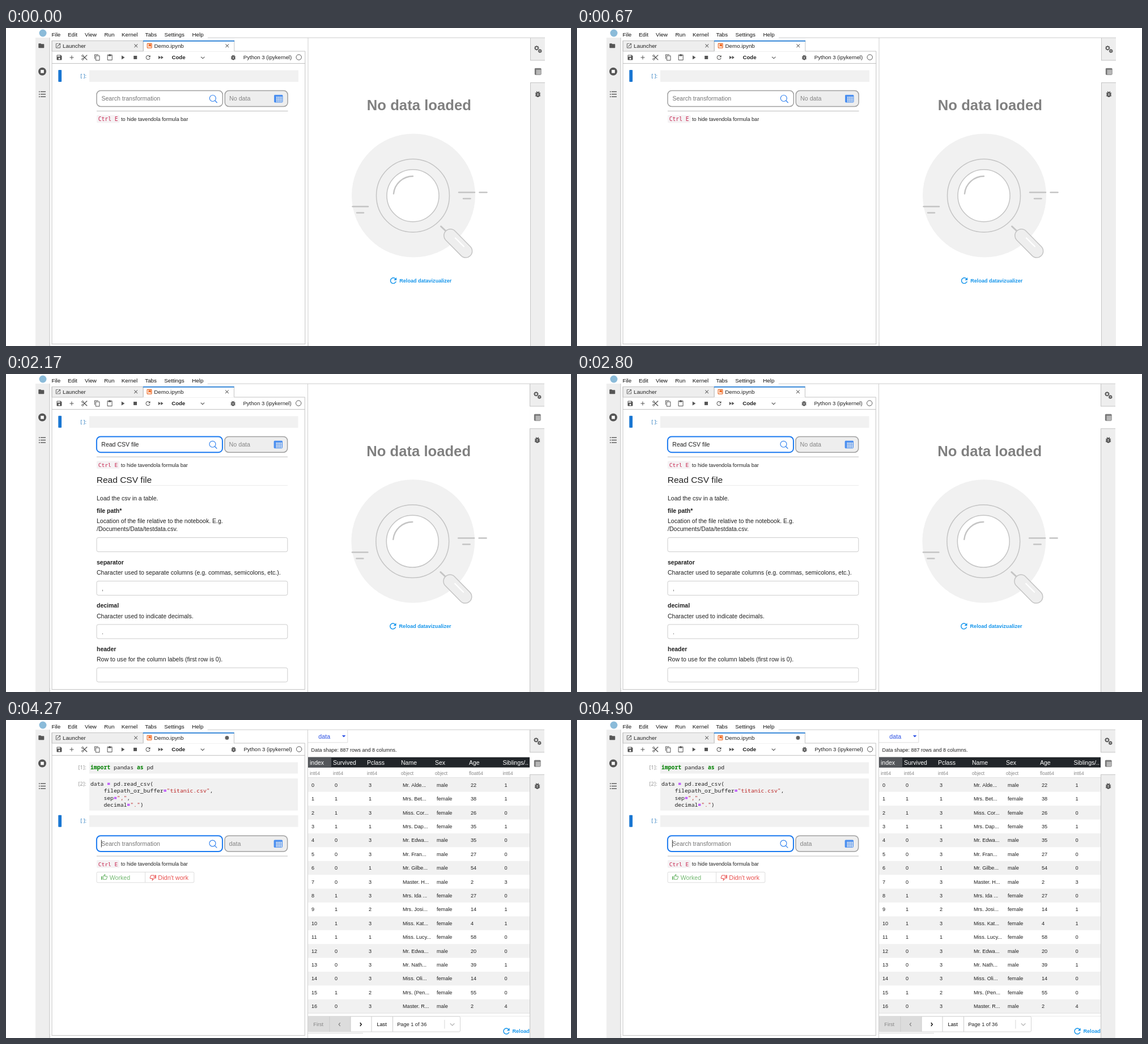
An HTML page with a canvas that plays this animation: 997 px wide and 561 px high, repeating every 5.32 s.

```html
<!DOCTYPE html>
<html lang="en">
<head>
<meta charset="utf-8">
<title>Notebook data import</title>
<style>
html, body { margin: 0; width: 100%; height: 100%; overflow: hidden; background: #fff; }
canvas { display: block; }
</style>
</head>
<body>
<canvas id="stage" width="997" height="561"></canvas>
<script>
const ctx = document.getElementById('stage').getContext('2d');
const SANS = '"Liberation Sans", Arial, sans-serif';
const MONO = '"Noto Sans Mono", "DejaVu Sans Mono", monospace';
const BLUE = '#1976d2', INK = '#212121', ICON = '#555', EDGE = '#c4c4c4', LINK = '#1495eb';

// Material-style icons on a 24 unit grid
const ICONS = {
  save: 'M17 3H5c-1.1 0-2 .9-2 2v14c0 1.1.9 2 2 2h14c1.1 0 2-.9 2-2V7l-4-4zm-5 16c-1.7 0-3-1.3-3-3s1.3-3 3-3 3 1.3 3 3-1.3 3-3 3zm3-10H5V5h10v4z',
  add: 'M19 13h-6v6h-2v-6H5v-2h6V5h2v6h6v2z',
  copy: 'M16 1H4C2.9 1 2 1.9 2 3v14h2V3h12V1zm3 4H8C6.9 5 6 5.9 6 7v14c0 1.1.9 2 2 2h11c1.1 0 2-.9 2-2V7c0-1.1-.9-2-2-2zm0 16H8V7h11v14z',
  paste: 'M19 2h-4.2C14.4.8 13.3 0 12 0S9.6.8 9.2 2H5C3.9 2 3 2.9 3 4v16c0 1.1.9 2 2 2h14c1.1 0 2-.9 2-2V4c0-1.1-.9-2-2-2zm0 18H5V4h2v3h10V4h2v16z',
  play: 'M8 5v14l11-7z',
  stop: 'M6 6h12v12H6z',
  skip: 'M4 18l8.5-6L4 6v12zm9-12v12l8.5-6L13 6z',
  reload: 'M17.65 6.35C16.2 4.9 14.2 4 12 4c-4.4 0-8 3.6-8 8s3.6 8 8 8c3.7 0 6.8-2.5 7.7-6h-2.1c-.8 2.3-3 4-5.6 4-3.3 0-6-2.7-6-6s2.7-6 6-6c1.7 0 3.1.7 4.2 1.8L13 11h7V4l-2.35 2.35z',
  bug: 'M20 8h-2.8c-.5-.8-1.1-1.5-1.8-2L17 4.4 15.6 3l-2.2 2.2a6 6 0 0 0-2.8 0L8.4 3 7 4.4 8.6 6c-.7.5-1.3 1.2-1.8 2H4v2h2.1l-.1 2H4v2h2l.1 2H4v2h2.8c1 1.8 3 3 5.2 3s4.2-1.2 5.2-3H20v-2h-2.1l.1-2h2v-2h-2l-.1-2H20V8zm-6 8h-4v-2h4v2zm0-4h-4v-2h4v2z',
  folder: 'M10 4H4c-1.1 0-2 .9-2 2v12c0 1.1.9 2 2 2h16c1.1 0 2-.9 2-2V8c0-1.1-.9-2-2-2h-8l-2-2z',
  launch: 'M19 19H5V5h7V3H5c-1.1 0-2 .9-2 2v14c0 1.1.9 2 2 2h14c1.1 0 2-.9 2-2v-7h-2v7zM14 3v2h3.6l-9.8 9.8 1.4 1.4L19 6.4V10h2V3h-7z',
  close: 'M19 6.4L17.6 5 12 10.6 6.4 5 5 6.4 10.6 12 5 17.6 6.4 19 12 13.4 17.6 19 19 17.6 13.4 12z',
  thumb: 'M9 21h9c.8 0 1.5-.5 1.8-1.2l3-7c.1-.3.2-.5.2-.8v-2c0-1.1-.9-2-2-2h-6.3l1-4.9c0-.4-.2-.8-.5-1L14.2 1 7.6 7.6C7.2 8 7 8.5 7 9v10c0 1.1.9 2 2 2zM9 9l4.3-4.3L12 10h9v2l-3 7H9V9zM1 9h4v12H1z'
};

function rect(x, y, w, h, color) {
  ctx.fillStyle = color;
  ctx.fillRect(x, y, w, h);
}

function box(x, y, w, h, r, fill, stroke, lw = 1) {
  ctx.beginPath();
  ctx.roundRect(x, y, w, h, r);
  if (fill) { ctx.fillStyle = fill; ctx.fill(); }
  if (stroke) { ctx.strokeStyle = stroke; ctx.lineWidth = lw; ctx.stroke(); }
}

function disc(x, y, r, fill, stroke, lw = 1) {
  box(x - r, y - r, 2 * r, 2 * r, r, fill, stroke, lw);
}

function line(color, lw, ...p) {
  ctx.beginPath();
  for (let i = 0; i < p.length; i += 2) ctx.lineTo(p[i], p[i + 1]);
  ctx.strokeStyle = color;
  ctx.lineWidth = lw;
  ctx.stroke();
}

// y is the middle of the capitals; returns the end of the text
function text(s, x, y, size, color = INK, weight = '', family = SANS) {
  ctx.font = `${weight} ${size}px ${family}`;
  ctx.fillStyle = color;
  ctx.fillText(s, x, y + size * 0.355);
  return x + ctx.measureText(s).width;
}

function icon(name, x, y, size = 12, color = ICON, turn = 0) {
  ctx.save();
  ctx.translate(x, y);
  ctx.rotate(turn);
  ctx.scale(size / 24, size / 24);
  ctx.translate(-12, -12);
  ctx.fillStyle = color;
  ctx.fill(new Path2D(ICONS[name]), 'evenodd');
  ctx.restore();
}

function gear(x, y, r) {
  disc(x, y, r, null, ICON, 1.5);
  for (let i = 0; i < 8; i++) {
    const a = i * Math.PI / 4, c = Math.cos(a), s = Math.sin(a);
    line(ICON, 1.3, x + c * r, y + s * r, x + c * (r + 1.7), y + s * (r + 1.7));
  }
}

function grid(x, y, w, h, color, cols, rows) {
  box(x, y, w, h, 1, null, color, 1);
  rect(x, y, w, h / rows, color);
  rect(x, y, w / cols, h, color);
  for (let i = 1; i < cols; i++) rect(x + i * w / cols - 0.35, y, 0.7, h, color);
  for (let i = 1; i < rows; i++) rect(x, y + i * h / rows - 0.35, w, 0.7, color);
}

function scissors(x, y) {
  disc(x - 3.2, y - 3, 1.5, null, ICON, 1);
  disc(x - 3.2, y + 3, 1.5, null, ICON, 1);
  line(ICON, 1.3, x - 2, y - 2, x + 4.7, y + 4.4);
  line(ICON, 1.3, x - 2, y + 2, x + 4.7, y - 4.4);
}

function sidebars() {
  rect(52, 17, 25, 544, '#eee');
  rect(76.5, 17, 1, 544, EDGE);
  icon('folder', 62.3, 31.2, 12);
  disc(64, 76.7, 7, ICON);
  rect(61.2, 73.9, 5.6, 5.6, '#fff');
  for (const y of [112.4, 116.8, 121.2]) {
    rect(58, y - 0.8, 1.7, 1.7, ICON);
    rect(61, y - 0.7, 9, 1.4, ICON);
  }
  rect(925, 17, 26, 544, '#eee');
  rect(925, 17, 1, 544, EDGE);
  rect(925, 57, 26, 39.5, '#fff');
  rect(925, 56.5, 26, 1, EDGE);
  rect(925, 96, 26, 1, EDGE);
  gear(936.4, 35.3, 2.6);
  gear(942.2, 40.6, 1.8);
  grid(933.3, 71.3, 10.8, 11, '#777', 5, 5);
  icon('bug', 938.5, 116.7, 14);
  rect(356, 16.7, 595, 1, '#ccc');
}

function topBar(dirty) {
  disc(65, 9, 6.5, '#8bbbd9');
  const menu = { File: 80.5, Edit: 109, View: 139, Run: 173.5, Kernel: 204, Tabs: 245.5, Settings: 279.5, Help: 328.5 };
  for (const k in menu) text(k, menu[k], 11.5, 9.8, '#111');

  rect(81, 22, 161, 19, '#eee');
  box(81, 22.5, 161, 18.5, 0, null, EDGE);
  rect(242, 40.5, 286, 1, EDGE);
  rect(242, 22, 161, 19.5, '#fff');
  rect(242, 22, 1, 19, EDGE);
  rect(402.3, 22, 1, 19, EDGE);
  rect(242, 22, 161, 1.7, BLUE);
  icon('launch', 92, 31.3, 11);
  text('Launcher', 100, 31.7, 9.8);
  icon('close', 229.3, 31.4, 11);
  box(249.3, 27.4, 7.8, 7.8, 0.6, null, '#ee6a24', 1.2);
  ctx.beginPath();
  ctx.fillStyle = '#ee6a24';
  [[251.5, 28.5], [256, 28.5], [256, 33.5], [253.7, 31.7], [251.5, 33.5]].forEach(p => ctx.lineTo(...p));
  ctx.fill();
  text('Demo.ipynb', 261.5, 31.7, 9.8);
  if (dirty) disc(390.3, 31.5, 3.4, '#616161');
  else icon('close', 390.3, 31.4, 11);

  icon('save', 94, 52);
  icon('add', 116, 52);
  scissors(138.5, 52);
  icon('copy', 161, 52);
  icon('paste', 183.2, 52);
  icon('play', 206, 52);
  icon('stop', 228.2, 52);
  icon('reload', 250.7, 52);
  icon('skip', 273, 52);
  text('Code', 292.5, 52, 9.6, INK, 'bold');
  line(ICON, 1.1, 344, 50.8, 347.2, 53.8, 350.4, 50.8);
  const dx = dirty ? 1 : 0;
  icon('bug', 401 + dx, 52);
  text('Python 3 (ipykernel)', 418.8 + dx, 52, 9.6);
  disc(516.7 + dx, 51.6, 4.7, null, ICON, 1);
}

function frameLines() {
  rect(80.5, 22, 1, 535.5, EDGE);
  rect(527.3, 41, 1, 516.5, EDGE);
  rect(80.5, 557, 447.8, 1, EDGE);
  rect(81, 62, 447, 1, '#c0c0c0');
  rect(532.5, 17, 1, 544, '#d0d0d0');
}

function emptyCell(y) {
  box(92.3, y, 5.8, 21, 1, BLUE);
  rect(147, y + 0.5, 369, 20.5, '#f1f1f1');
  text('[ ]:', 131.3, y + 10.5, 9, '#307fc1', '', '"Noto Sans", sans-serif');
}

function searchBar(value, data, focus, typed) {
  box(160, 110.6, 222.3, 27.8, 7, '#fff', focus ? '#1b7af0' : '#a0a0a0', focus ? 2 : 1.5);
  text(value, 168.4, 124.6, 10.55, typed ? INK : '#757575');
  disc(364.8, 124, 5.5, null, '#3584ee', 1.2);
  line('#3584ee', 1.3, 368.7, 128, 372.6, 132);
  box(386.3, 110.6, 110.8, 27.8, 7, '#eee', '#a0a0a0', 1.5);
  text(data, 394, 124.6, 10.7, '#858585');
  grid(473.6, 118.4, 14.4, 12.6, '#4a8ff0', 5, 5);
  rect(160, 146, 337.5, 1, '#bdbdbd');
}

function hint() {
  box(160, 153.5, 40.5, 14, 2, '#f5f2f4');
  text('Ctrl E', 162.8, 160.7, 9.6, '#c7254e', '', '"DejaVu Sans Mono", monospace');
  text('to hide tavendola formula bar', 203, 160.7, 9.15);
}

function emptyPanel() {
  text('No data loaded', 636.8, 136, 25.7, '#808080', 'bold');
  disc(719, 295.5, 109, '#f1f1f1');
  disc(718, 295.7, 64.5, null, '#c4c4c4', 1.5);
  disc(718, 295.7, 46, '#fff', '#c4c4c4', 1.5);
  ctx.lineCap = 'round';
  ctx.beginPath();
  ctx.arc(718, 295.7, 34.2, Math.PI * 1.03, Math.PI * 1.5);
  ctx.strokeStyle = '#c4c4c4';
  ctx.lineWidth = 2.4;
  ctx.stroke();
  for (const [x, y, w] of [[799, 290, 28], [835.5, 290, 13], [807, 301, 12.5], [611.5, 315, 27.5], [619, 326, 12]])
    line('#c4c4c4', 2.5, x, y, x + w, y);
  line('#c4c4c4', 2.8, 767.5, 350, 776, 358);
  line('#c4c4c4', 24.4, 784.2, 366.2, 811.2, 393.6);
  line('#eee', 21.4, 784.2, 366.2, 811.2, 393.6);
  line('#fff', 2.2, 793, 370.5, 808, 385.5);
  ctx.lineCap = 'butt';
  icon('reload', 683.5, 445.7, 17, LINK);
  text('Reload datavizualizer', 694.3, 445.8, 9.05, LINK, 'bold');
}

function dropdown() {
  ctx.save();
  ctx.shadowColor = 'rgba(0,0,0,.22)';
  ctx.shadowBlur = 4;
  ctx.shadowOffsetY = 2;
  box(160, 146, 223, 188, 3, '#fff');
  ctx.restore();
  rect(160, 147.3, 223, 26.6, '#deeafc');
  ['Read CSV file', 'Read Norvu file', 'Read Foldgrid Base', 'Read Quorvo Sheet', 'Write Quorvo Sheet',
    '[Snippet] Read csv folder', '[Snippet] Get csv from FTP server']
    .forEach((s, i) => text(s, 168.5, 160.6 + i * 26.25, 10.4));
}

function field(y, value, focus) {
  ctx.save();
  if (focus) { ctx.shadowColor = 'rgba(80,160,230,.6)'; ctx.shadowBlur = 6; }
  box(160, y, 336.8, 25, 3, '#fff', focus ? '#74b3e8' : '#ccc');
  ctx.restore();
  text(value, 169, y + 13, 10.55, '#555');
}

// y: middle of the first line
function form(y, path) {
  text('Load the csv in a table.', 160, y, 10.55);
  const label = (s, d) => text(s, 160, y + d, 10.5, INK, 'bold');
  const note = (s, d) => text(s, 160, y + d, 10.55);
  label('file path*', 22);
  note('Location of the file relative to the notebook. E.g.', 40);
  note('/Documents/Data/testdata.csv.', 54.3);
  field(y + 69.3, path, path);
  label('separator', 112.7);
  note('Character used to separate columns (e.g. commas, semicolons, etc.).', 131);
  field(y + 146, ',');
  label('decimal', 189.3);
  note('Character used to indicate decimals.', 207.6);
  field(y + 222.6, '.');
  label('header', 266);
  note('Row to use for the column labels (first row is 0).', 284.2);
  field(y + 299, '');
  if (path) {
    line('#e03030', 1, 169, y + 87.2, 217, y + 87.2);
    for (let x = 171; x < 217; x += 3) rect(x, y + 86.5, 1, 1.5, '#fff');
    label('new table name', 342.6);
    field(y + 353.8, '');
    text('Leave blank to modify selected table', 169, y + 366.6, 10.5, '#999');
    box(160, y + 400.8, 52.2, 25, 3, '#31b0d5');
    text('Submit', 169, y + 413.6, 10.7, '#fff');
  }
}

function codeCells() {
  rect(147, 74.5, 368, 20, '#f1f1f1');
  rect(147, 103.2, 368, 56.5, '#f1f1f1');
  const op = '#a2f', str = '#ba2121', kw = '#008000';
  const code = (y, indent, ...parts) => {
    let x = 149 + indent * 5.85;
    for (const [s, color = INK, w = ''] of parts) x = text(s, x, y, 9.75, color, w, MONO);
  };
  code(84, 0, ['import', kw, 'bold'], [' pandas '], ['as', kw, 'bold'], [' pd']);
  code(112.5, 0, ['data '], ['=', op, 'bold'], [' pd'], ['.'], ['read_csv(']);
  code(125, 4, ['filepath_or_buffer'], ['=', op, 'bold'], ['"titanic.csv"', str], [',']);
  code(137.5, 4, ['sep'], ['=', op, 'bold'], ['","', str], [',']);
  code(150, 4, ['decimal'], ['=', op, 'bold'], ['"."', str], [')']);
  [84, 113].forEach((y, i) => text(`[${i + 1}]:`, 127.6, y, 9.2, '#999', '', '"Noto Sans", sans-serif'));
}

function feedback() {
  box(160, 268.3, 171.8, 18.5, 2, '#fff', '#ddd');
  rect(245, 268, 1, 19, '#ddd');
  icon('thumb', 173.5, 277.3, 12, '#72b870');
  text('Worked', 182.8, 277.8, 10.6, '#72b870');
  icon('thumb', 259.3, 278, 12, '#e8504e', Math.PI);
  text("Didn't work", 268.3, 277.8, 10.9, '#e8504e');
}

const COLS = [536, 577, 637, 697, 757, 817, 876.5];
const HEADS = 'index Survived Pclass Name Sex Age Siblings/..'.split(' ');
const TYPES = 'int64 int64 int64 object object float64 int64'.split(' ');
const ROWS = `0,3,Mr. Alde...,male,22,1
1,1,Mrs. Bet...,female,38,1
1,3,Miss. Cor...,female,26,0
1,1,Mrs. Dap...,female,35,1
0,3,Mr. Edwa...,male,35,0
0,3,Mr. Fran...,male,27,0
0,1,Mr. Gilbe...,male,54,0
0,3,Master. H...,male,2,3
1,3,Mrs. Ida ...,female,27,0
1,2,Mrs. Josi...,female,14,1
1,3,Miss. Kat...,female,4,1
1,1,Miss. Lucy...,female,58,0
0,3,Mr. Edwa...,male,20,0
0,3,Mr. Nath...,male,39,1
0,3,Miss. Oli...,female,14,0
1,2,Mrs. (Pen...,female,55,0
0,3,Master. R...,male,2,4`.split('\n').map((r, i) => [i, ...r.split(',')]);

function tablePanel() {
  ctx.save();
  ctx.beginPath();
  ctx.rect(533, 17, 391, 544);
  ctx.clip();
  box(532.5, 17.3, 70.3, 22.5, 0, '#fff', '#ddd');
  text('data', 551.3, 29, 10.7, '#2b50e4');
  ctx.beginPath();
  ctx.fillStyle = '#2b50e4';
  [[592.8, 27], [599.4, 27], [596.1, 30.6]].forEach(p => ctx.lineTo(...p));
  ctx.fill();
  text('Data shape: 887 rows and 8 columns.', 538.5, 53, 9);
  rect(533, 65.7, 391, 18, '#212529');
  rect(533, 65.7, 41, 18, '#53565a');
  HEADS.forEach((s, i) => text(s, COLS[i], 75.7, 10.5, '#fff'));
  TYPES.forEach((s, i) => text(s, COLS[i], 94.2, 8.3, '#888'));
  rect(533, 101.3, 391, 1, '#d8d8d8');
  ROWS.forEach((row, n) => {
    const y = 102.3 + n * 24.41;
    if (n % 2 === 0) rect(533, y, 391, 24.41, '#f1f1f1');
    row.forEach((v, i) => text(String(v), COLS[i] + 3, y + 12.2, 9.1));
  });
  rect(533, 516.8, 391, 0.8, '#ddd');
  rect(533, 522, 391, 0.8, '#e4e4e4');
  box(532.5, 523, 269, 27, 2, '#fff', '#d5d5d5');
  rect(533, 523, 75, 27, '#dcdcdc');
  for (const x of [570.5, 607.5, 644.5, 682]) rect(x, 523, 1, 27, '#ccc');
  text('First', 542.3, 537, 9.2, '#888');
  text('Last', 654.4, 537, 9.2, '#000');
  line('#777', 1.2, 589.7, 534, 587.3, 537, 589.7, 540);
  line('#000', 1.3, 624.8, 534, 627.2, 537, 624.8, 540);
  text('Page 1 of 36', 690.2, 537, 9.2);
  rect(773.5, 529, 0.8, 15.5, '#ccc');
  line('#bbb', 1.4, 783.8, 535.2, 787.6, 539, 791.4, 535.2);
  rect(533, 552, 97, 0.8, '#d0d0d0');
  icon('reload', 883, 549, 17, LINK);
  text('Reload', 893.5, 549, 9.1, LINK, 'bold');
  ctx.restore();
}

function draw(scene) {
  ctx.setTransform(1, 0, 0, 1, 0, 0);
  rect(0, 0, 997, 561, '#fff');
  // the window shrinks by about a pixel between screens
  const sx = scene > 1 ? 0.9989 : 1, sy = scene ? 0.9982 : 1;
  const fit = () => ctx.setTransform(sx, 0, 0, sy, 52 * (1 - sx), 0);
  if (scene === 3) {
    ctx.save();
    ctx.beginPath();
    ctx.rect(82, 62.5, 445, 494);
    ctx.clip();
    form(66.7, 'titanic.csv');
    ctx.restore();
  }
  if (scene === 2) form(219.3, '');
  fit();
  sidebars();
  rect(52, 555, 25, 8, '#eee');
  rect(76.5, 555, 1, 8, EDGE);
  rect(925, 555, 26, 8, '#eee');
  rect(925, 555, 1, 8, EDGE);
  topBar(scene === 4);
  frameLines();
  rect(532.5, 555, 1, 8, '#d0d0d0');
  if (scene < 4) emptyPanel();
  if (scene < 3) {
    emptyCell(74);
    const picked = scene === 2;
    searchBar(picked ? 'Read CSV file' : 'Search transformation', 'No data', scene > 0, picked);
    if (scene !== 1) hint();
  }
  if (scene === 4) {
    emptyCell(168);
    ctx.translate(0, 94);
    searchBar('Search transformation', 'data', true);
    hint();
    rect(168, 118, 0.9, 13, '#222');
  }
  ctx.setTransform(1, 0, 0, 1, 0, 0);
  if (scene === 1) dropdown();
  if (scene === 2) {
    text('Read CSV file', 159.8, 186, 15.5);
    rect(160, 196.3, 337, 0.8, '#e5e5e5');
  }
  if (scene === 4) {
    codeCells();
    feedback();
    tablePanel();
  }
}

const CUTS = [1120, 2170, 3220, 4270], LOOP = 5320;
const start = performance.now();
let shown = -1;

function tick() {
  const t = (performance.now() - start) % LOOP;
  const scene = CUTS.filter(c => t >= c).length;
  if (scene !== shown) draw(shown = scene);
  requestAnimationFrame(tick);
}
tick();
</script>
</body>
</html>
```
